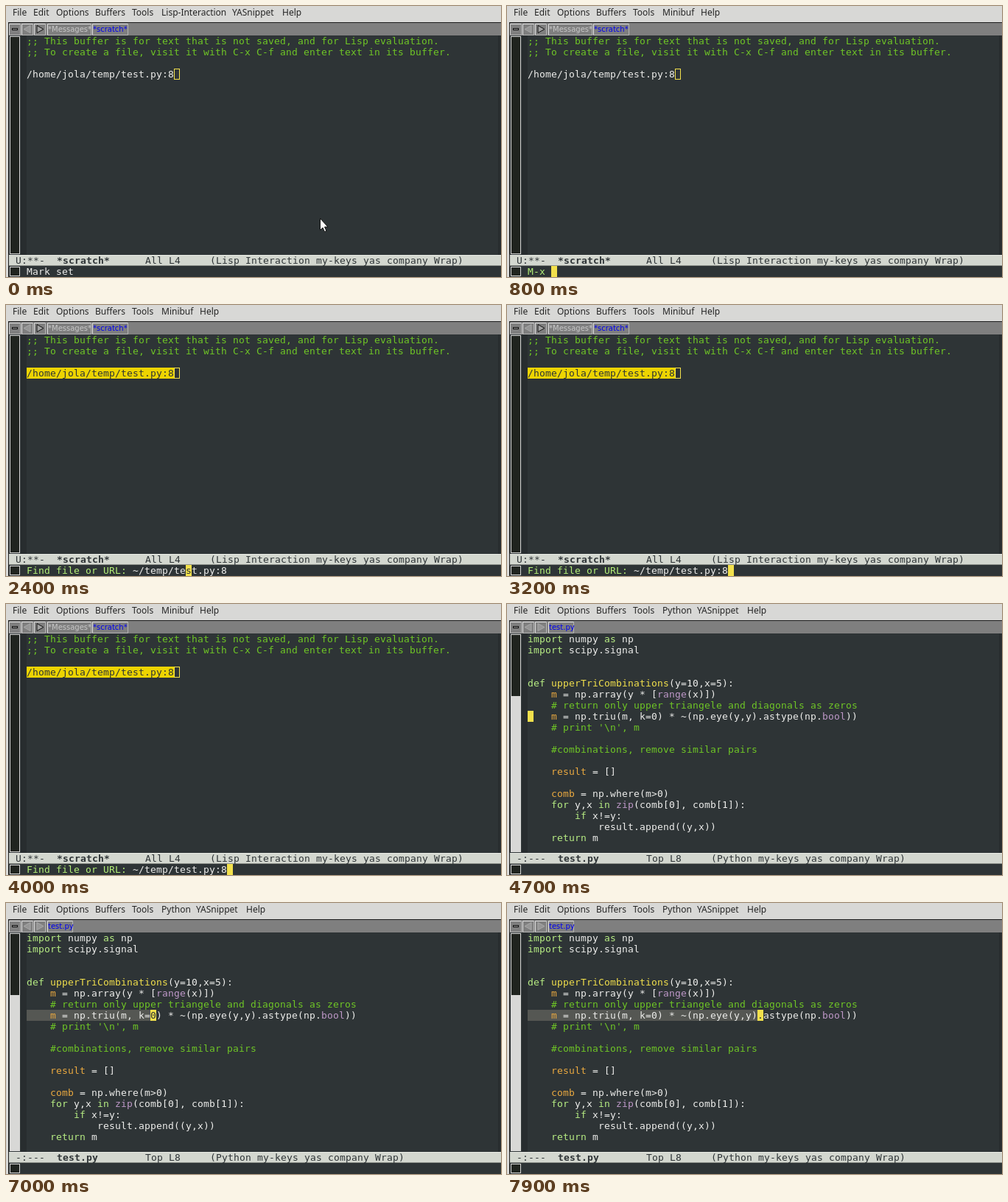
An HTML page that plays this animation: 672x368 px, repeating every 8 s.

```html
<!DOCTYPE html>
<html lang="en">
<head>
<meta charset="utf-8">
<title>Find file at point</title>
<style>
  html, body { margin: 0; width: 100%; height: 100%; overflow: hidden; background: #2e3436; }
  svg { display: block; width: 672px; height: 368px; }
  text { white-space: pre; }
  .mono { font: 13px "DejaVu Sans Mono", monospace; letter-spacing: var(--gap, 0); }
  .bold { font-weight: bold; }
  .menu { font: 12px "Noto Sans", "Open Sans", sans-serif; }
  .tab { font: 10px "DejaVu Sans", sans-serif; }
</style>
</head>
<body>
<svg id="stage" viewBox="0 0 672 368" xmlns="http://www.w3.org/2000/svg"></svg>
<script>
const NS = 'http://www.w3.org/2000/svg';
const LOOP = 8000, CHAR = 8, LINE = 15, ASCENT = 12;
const LEFT = 28, TOP = 40, MODE_TOP = 338, ECHO_TOP = 353;
const BG = '#2e3436', FG = '#eeeeec', YELLOW = '#f2e04c', PANEL = '#d8d8d6', DARK = '#1c1c1c', FRINGE = '#282d2f';
// k keyword, c comment, f function, v variable, b builtin, p prompt
const FACES = { k: '#b8ee84', c: '#6fc626', f: YELLOW, v: '#eaa940', b: '#be98c8', p: '#b4f078' };

const stage = document.getElementById('stage');

function add(parent, tag, attrs = {}) {
  const el = document.createElementNS(NS, tag);
  for (const [key, value] of Object.entries(attrs)) el.setAttribute(key, value);
  return parent.appendChild(el);
}
const group = (parent = stage) => add(parent, 'g');
const rect = (parent, x, y, width, height, fill) => add(parent, 'rect', { x, y, width, height, fill });
const path = (parent, d, fill, stroke = 'none') => add(parent, 'path', { d, fill, stroke });

function label(parent, x, y, str, cls, fill) {
  const el = add(parent, 'text', { x, y, class: cls, fill });
  el.textContent = str;
  return el;
}

// Terminal cells are whole pixels wide, so round the font's advance up to the cell.
function snapToCells() {
  const probe = label(stage, 0, 0, 'm'.repeat(50), 'mono', 'none');
  const advance = probe.getComputedTextLength() / 50;
  stage.style.setProperty('--gap', `${CHAR - advance}px`);
  probe.remove();
}

// Splits "{k:import} numpy" into coloured spans.
function setMarkup(el, markup) {
  el.textContent = '';
  for (const part of markup.split(/(\{\w:.*?\})/)) {
    const face = part.match(/^\{(\w):(.*)\}$/);
    const span = add(el, 'tspan', face ? { fill: FACES[face[1]] } : {});
    span.textContent = face ? face[2] : part;
  }
}

function lines(parent, rows) {
  rows.forEach((row, i) => {
    if (row) setMarkup(label(parent, LEFT, TOP + ASCENT + i * LINE, '', 'mono', FG), row);
  });
}

function menu(parent, items) {
  for (const [x, name] of items) label(parent, x, 13, name, 'menu', '#252525');
}

function modeline(parent, state, name, place, modes) {
  const put = (col, str, cls = 'mono') =>
    label(parent, 5 + col * CHAR, MODE_TOP + ASCENT, str, cls, BG);
  put(1, state);
  put(8, name, 'mono bold');
  put(23, place);
  put(34, modes);
}

function bevel(parent, x, w) {
  path(parent, `M${x + .5} 39.5V24.5H${x + w - .5}`, 'none', '#e0e0e0');
  path(parent, `M${x + .5} 39.5H${x + w - .5}V24.5`, 'none', '#b4b4b4');
}

function tab(parent, x, w, name, active) {
  bevel(parent, x, w);
  label(parent, x + 1, 35, name, 'tab', active ? '#0000f0' : '#c8c8c8');
}

function arrow(parent, x, dir, on) {
  path(parent, `M${x - 4 * dir} 26.5V36.5L${x + 5 * dir} 31.5Z`,
    on ? '#a0a0a0' : '#969696', on ? '#111' : '#a8a8a8');
}

function scrollbar(parent, y, h, thumb = h - 2) {
  rect(parent, 5, y, 14, h, PANEL);
  rect(parent, 6, y + 1, 12, thumb, '#20241f');
}

snapToCells();

// Window frame
rect(stage, 0, 0, 672, 368, BG);
rect(stage, 0, 0, 672, 22, PANEL);
rect(stage, 0, 0, 3, 368, PANEL);
rect(stage, 3, 22, 669, 1, DARK);
rect(stage, 3, 22, 1, 346, DARK);
rect(stage, 4, 23, 668, 17, '#7f7f7f');
rect(stage, 20, TOP, 8, MODE_TOP - TOP, FRINGE);
rect(stage, 668, TOP, 4, MODE_TOP - TOP, FRINGE);
rect(stage, 4, MODE_TOP, 668, LINE, '#d3d7cf');
rect(stage, 4, MODE_TOP, 668, 1, '#e8ebe4');
rect(stage, 4, ECHO_TOP - 1, 668, 1, '#8c8f89');
for (const x of [4, 21, 38]) bevel(stage, x, 16);
rect(stage, 8, 30, 8, 3, '#111');
rect(stage, 9, 31, 6, 1, '#999');
arrow(stage, 29, -1, false);
scrollbar(stage, 354, 13);
menu(stage, [[9, 'File'], [37, 'Edit'], [68, 'Options'], [121, 'Buffers'], [171, 'Tools']]);

const menus = {
  lisp: [[211, 'Lisp-Interaction'], [307, 'YASnippet'], [375, 'Help']],
  minibuf: [[211, 'Minibuf'], [263, 'Help']],
  python: [[211, 'Python'], [258, 'YASnippet'], [326, 'Help']]
};
for (const name in menus) {
  const g = group();
  menu(g, menus[name]);
  menus[name] = g;
}

// Scratch buffer
const PATH = '/home/jola/temp/test.py:8';
const PATH_TOP = TOP + 3 * LINE, PATH_WIDTH = PATH.length * CHAR;
const scratch = group();
arrow(scratch, 46, 1, true);
tab(scratch, 56, 60, '*Messages*', false);
tab(scratch, 117, 49, '*scratch*', true);
scrollbar(scratch, 41, 296);
lines(scratch, [
  '{c:;; This buffer is for text that is not saved, and for Lisp evaluation.}',
  '{c:;; To create a file, visit it with C-x C-f and enter text in its buffer.}',
  '',
  PATH
]);
modeline(scratch, 'U:**-', '*scratch*', 'All L4', '(Lisp Interaction my-keys yas company Wrap)');
const found = group(scratch);
rect(found, LEFT, PATH_TOP, PATH_WIDTH, LINE, '#edd400');
label(found, LEFT, PATH_TOP + ASCENT, PATH, 'mono', BG);
rect(scratch, LEFT + PATH_WIDTH + .5, PATH_TOP + .5, CHAR - 1, LINE - 1, 'none').setAttribute('stroke', YELLOW);

// Python buffer
const CODE_LINE = '    m = np.triu(m, k=0) * ~(np.eye(y,y).astype(np.bool))';
const CODE_TOP = TOP + 7 * LINE;
const python = group();
arrow(python, 46, 1, false);
tab(python, 56, 35, 'test.py', true);
scrollbar(python, 41, 296, 83);
const region = rect(python, LEFT, CODE_TOP, 0, LINE, '#555753');
lines(python, [
  '{k:import} numpy {k:as} np',
  '{k:import} scipy.signal',
  '',
  '',
  '{k:def} {f:upperTriCombinations}(y=10,x=5):',
  '    {v:m} = np.array(y * [{b:range}(x)])',
  '    {c:# return only upper triangele and diagonals as zeros}',
  CODE_LINE.replace('m', '{v:m}').replace('bool', '{b:bool}'),
  "    {c:# print '\\n', m}",
  '',
  '    {c:#combinations, remove similar pairs}',
  '',
  '    {v:result} = []',
  '',
  '    {v:comb} = np.where(m>0)',
  '    {k:for} y,x {k:in} {b:zip}(comb[0], comb[1]):',
  '        {k:if} x!=y:',
  '            result.append((y,x))',
  '    {k:return} m'
]);
modeline(python, '-:---', 'test.py', 'Top L8', '(Python my-keys yas company Wrap)');

// Echo area, cursor and pointer
const echo = label(stage, LEFT, ECHO_TOP + ASCENT, '', 'mono', FG);
const cursor = group();
rect(cursor, 0, 0, CHAR, LINE, YELLOW);
const cursorChar = label(cursor, 0, ASCENT, '', 'mono', BG);
const pointer = path(stage,
  'M426.5 288.5V304.5L430 301L432.5 306.5L435 305.5L432.5 300H437Z', '#fff', '#111');

const show = (el, on) => el.setAttribute('display', on ? 'inline' : 'none');

function placeCursor(col, top, char = '') {
  cursor.setAttribute('transform', `translate(${LEFT + col * CHAR} ${top})`);
  cursorChar.textContent = char;
}

const OPEN_PROMPT = 300, FIND_PROMPT = 2100, TO_END = 3000, VISIT = 4300;
const KEY_TIMES = [1200, 1500, 1700, 1800];
const COMMAND = 'ffap', FILE = '~/temp/test.py:8', ASK = 'Find file or URL: ';

function minibuffer(t) {
  if (t < OPEN_PROMPT) return { prompt: '', input: 'Mark set' };
  if (t < FIND_PROMPT) {
    const typed = KEY_TIMES.filter(k => t >= k).length;
    return { prompt: 'M-x ', input: COMMAND.slice(0, typed), at: typed };
  }
  if (t < VISIT) return { prompt: ASK, input: FILE, at: t < TO_END ? 9 : FILE.length };
  return { prompt: '', input: '' };
}

// Two single presses, then key repeat at 20 columns a second.
function column(t) {
  if (t < 5300) return 0;
  if (t < 5500) return 1;
  return 2 + Math.max(0, Math.floor((t - 6050) / 50));
}

let lastEcho = null;

function draw(t) {
  const visiting = t >= VISIT, asking = t >= OPEN_PROMPT && !visiting;
  show(menus.lisp, t < OPEN_PROMPT);
  show(menus.minibuf, asking);
  show(menus.python, visiting);
  show(scratch, !visiting);
  show(python, visiting);
  show(found, t >= FIND_PROMPT);
  show(pointer, t < 100);
  show(cursor, asking || visiting);

  const { prompt, input, at } = minibuffer(t);
  const markup = (prompt ? `{p:${prompt}}` : '') + input;
  if (markup !== lastEcho) setMarkup(echo, lastEcho = markup);

  if (visiting) {
    const col = column(t);
    region.setAttribute('width', col * CHAR);
    placeCursor(col, CODE_TOP, CODE_LINE[col]);
  } else if (asking) {
    placeCursor(prompt.length + at, ECHO_TOP, input[at]);
  }
}

const start = performance.now();
function tick() {
  draw((performance.now() - start) % LOOP);
  requestAnimationFrame(tick);
}
tick();
</script>
</body>
</html>
```
